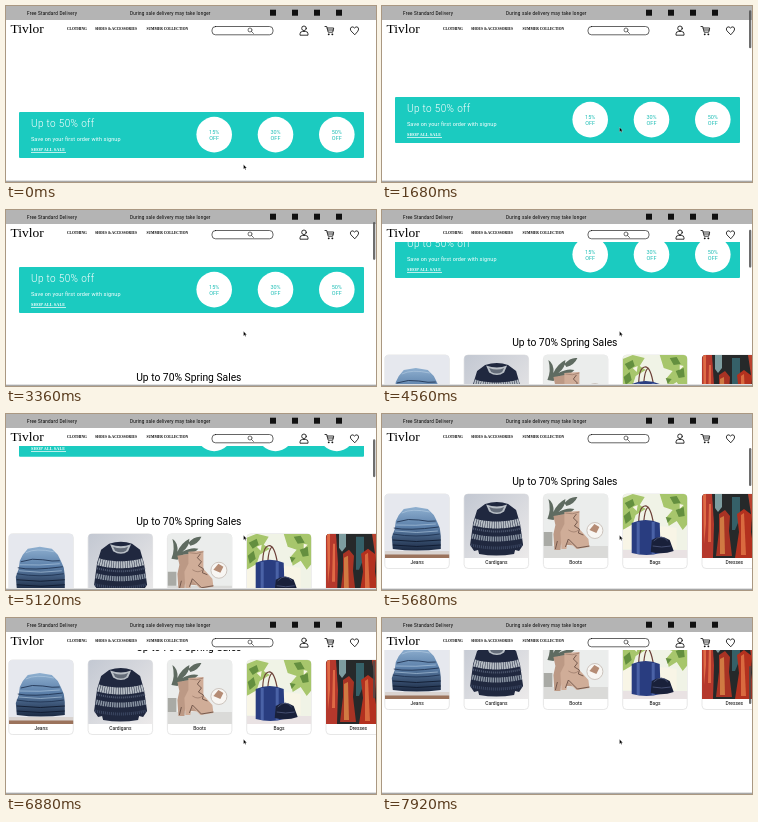
Animation, 370 px wide and 176 px high, one loop 8 s. Source, as an HTML page:

```html
<!DOCTYPE html>
<html lang="en">
<head>
<meta charset="utf-8">
<title>Shop page</title>
<style>
html, body { margin: 0; width: 100%; height: 100%; overflow: hidden; background: #fff; }
svg { display: block; width: 100vw; height: 100vh; }
text { font-family: Roboto, Inter, sans-serif; }
.serif { font-family: "Liberation Serif", "Noto Serif", serif; }
.mid { text-anchor: middle; }
.line { fill: none; stroke: #111; stroke-width: .85; stroke-linecap: round; stroke-linejoin: round; }
</style>
</head>
<body>
<svg viewBox="0 0 370 176" xmlns="http://www.w3.org/2000/svg">
  <defs>
    <clipPath id="photo"><path d="M0 64V4a4 4 0 0 1 4-4H60.500a4 4 0 0 1 4 4V64z"/></clipPath>
    <linearGradient id="wall" x2="1" y2="1">
      <stop stop-color="#c3c8d2"/><stop offset="1" stop-color="#eceaea"/>
    </linearGradient>
    <linearGradient id="denim" x2="0" y2="1">
      <stop stop-color="#8fb0d0"/><stop offset=".45" stop-color="#5c80aa"/><stop offset="1" stop-color="#1b2942"/>
    </linearGradient>
    <linearGradient id="edge" x2="0" y2="1">
      <stop stop-color="#fff"/><stop offset="1" stop-color="#8a8a8a"/>
    </linearGradient>
    <g id="jeans">
      <path fill="#e6e8ee" d="M0 0H65V64H0z"/>
      <path fill="#d9d3d0" d="M0 57H65V64H0z"/>
      <path fill="#9b735c" d="M0 60.500H65V64H0z"/>
      <path fill="url(#denim)" d="M14 21l5-6 12-2 12 2 6 6 3 6 3 7 1 8v13q-24 3-48 0l-1-12 3-8 1-8z"/>
      <g fill="none" stroke="#223655" stroke-width=".9">
        <path d="M12 28q12-4 22-2t17 1M9 34q14 3 45-1M8 40q23 4 47 0"/>
        <path stroke="#101b30" d="M8 46q23 3 48 0M8 51q24 3 48 0"/>
        <path stroke="#b6cde2" stroke-width=".6" d="M17 19q10-5 28-1M11 31q20 1 40-1M10 37q22 3 43 0"/>
      </g>
    </g>
    <g id="cardigan">
      <path fill="url(#wall)" d="M0 0H65V64H0z"/>
      <path fill="#20283f" d="M21 10q12-4 23 0l8 6 4 14 3 21-4 6-4-1-1 4q-18 3-35 0l-1-4-4 1-4-6 3-22 4-13z"/>
      <path fill="#b9bfc6" d="M22 10.500q11 4 21 0l-3 7q-7 5-15 0z"/>
      <path fill="#646c79" d="M25 13q8 3 15 0l-2 4q-5 3-11 0z"/>
      <g fill="none">
        <path stroke="#b8bfc6" stroke-width="7" stroke-dasharray="1.800 .5" d="M10 28q22 6 45 0"/>
        <path stroke="#4f5a72" stroke-width="2" stroke-dasharray="1 1" d="M9 34.500q23 6 48 0"/>
        <path stroke="#8b96a4" stroke-width="5" stroke-dasharray="1.500 .8" d="M8 42q23 6 50 0"/>
        <path stroke="#3c4863" stroke-width="3" stroke-dasharray="1 1" d="M7 51q25 6 51 0"/>
      </g>
    </g>
    <g id="boots">
      <path fill="#ebedec" d="M0 0H65V64H0z"/>
      <path fill="#dadad8" d="M0 52H65V64H0z"/>
      <path fill="#5f6b61" d="M4 25Q8 16 5 5q6 4 5 13 4-9 12-13 0 8-7 13 9-5 16-3-5 6-15 6l-6 5zM21 9q6-7 13-6-3 7-11 9z"/>
      <path fill="#a9aaa5" d="M0 38H9V52H0z"/>
      <circle cx="51.500" cy="36.500" r="8" fill="#f8f6f3" stroke="#c2b8b0" stroke-width=".8"/>
      <path fill="#b58c75" d="M46 36l5-6 5 3-3 6z"/>
      <path fill="#bc9985" d="M10 22l12-2 3 17 11 8 2 7-15-1-5-5-1 10H11l-1-16 2-9z"/>
      <path fill="#d0ad98" d="M21 18l15-1v18l9 10 1 8-13 2-9-9-1 9h-5l-1-17 4-8z"/>
      <path fill="none" stroke="#6b5146" stroke-width=".9" d="M22 53l3-8 9 9 12-2M12 55l2-8M33 20l-3 4 4 4-3 4 5 3-1 4 5 2"/>
      <path fill="none" stroke="#8e6e5e" stroke-width=".6" d="M22 19q7 2 14-1M25 36q6 4 10 0"/>
    </g>
    <g id="bags">
      <path fill="#f0f3e6" d="M0 0H65V64H0z"/>
      <path fill="#a7c66c" d="M0 4l10-4 12 3-5 8 6 4-10 6-4 12-9 3zM37 0h28v30l-5 6-6-9-8 5-2-9 6-7-9-3z"/>
      <path fill="#648f3f" d="M2 9l8-4 2 6-6 4zM1 22l6-5 2 8-6 5zM47 3l7-1 4 7-7 1zM53 16l8-3 1 9-6 1zM43 23l6 1-4 5z"/>
      <path fill="#f8f5e6" d="M10 13l5-2-1 6zM57 10l4 1-4 4zM0 36l12-7 42 5v21H0z"/>
      <path fill="#e9e2e3" d="M0 56H65V64H0z"/>
      <path fill="none" stroke="#6b3f37" stroke-width="1.200" d="M16 30q0-17 6-18t9 19M21 29q1-15 5-16"/>
      <path fill="#293d80" d="M9 29q14-6 28 0l1 30q-14 4-29 0z"/>
      <path fill="#4a62a6" d="M14 28h3v32h-3zM29 28h3v32h-3z"/>
      <path fill="#19203a" d="M29 46q9-6 18 0l4 11q-11 4-23 1z"/>
      <path fill="none" stroke="#4a5478" stroke-width=".9" d="M31 47q8-8 14 0M30 52q9 2 18 0"/>
    </g>
    <g id="dresses">
      <path fill="#26292a" d="M0 0H65V64H0z"/>
      <path fill="#b5382c" d="M0 0H10L12 30 11 64H0z"/>
      <path fill="#df6a45" d="M1 0H4V30L2 50zM7 10H9V48H6z"/>
      <path fill="#7d9da0" d="M13 0H20V13L16 18 13 14z"/>
      <path fill="#a83324" d="M17 20l6-4 5 6-1 15 3 25H14l3-25z"/>
      <path fill="#d07a42" d="M18 24l4-2 1 38h-5z"/>
      <path fill="#356068" d="M30 3H38V24L33 36H30z"/>
      <path fill="#b3311f" d="M35 20l7-5 8 6-1 17 4 26H33l4-26z"/>
      <path fill="#d96a3f" d="M39 21l3-2 2 42h-5z"/>
      <path fill="#b8422f" d="M46 0H65V64H54L49 20z"/>
    </g>
  </defs>

  <rect width="370" height="176" fill="#fff"/>
  <g id="page">
    <rect x="13" y="106" width="345" height="46" rx="1" fill="#1bcbc0"/>
    <g fill="#fff">
      <text x="25" y="121" font-size="10" font-weight="300" letter-spacing=".35">Up to 50% off</text>
      <text x="25" y="134.500" font-size="5.500" letter-spacing=".1">Save on your first order with signup</text>
      <text class="serif" x="25" y="145.200" font-size="4.200" font-weight="700" letter-spacing=".15">SHOP ALL SALE</text>
      <rect x="25" y="146.300" width="35" height=".7"/>
    </g>
    <g id="offers"></g>
    <text class="mid" x="182.800" y="220" font-size="10.300" fill="#000">Up to 70% Spring Sales</text>
    <g id="cards"></g>
  </g>

  <g id="header">
    <rect width="370" height="32" fill="#fff"/>
    <rect width="370" height="14" fill="#b4b4b4"/>
    <g font-size="4.600" letter-spacing=".2">
      <text x="21" y="8.700">Free Standard Delivery</text>
      <text x="124" y="8.700">During sale delivery may take longer</text>
    </g>
    <g id="social"></g>
    <text class="serif" x="4.500" y="27" font-size="13.500">Tivlor</text>
    <g font-size="3.600" font-weight="700">
      <text class="serif" x="61" y="24.200">CLOTHING</text>
      <text class="serif" x="89" y="24.200">SHOES &amp; ACCESSORIES</text>
      <text class="serif" x="140.500" y="24.200">SUMMER COLLECTION</text>
    </g>
    <g class="line">
      <rect x="206" y="20.500" width="61" height="8.300" rx="3.500" stroke-width=".65"/>
      <path stroke-width=".6" d="M246 24a2 2 0 1 0-4 0 2 2 0 0 0 4 0M245.500 25.500l2 2"/>
      <circle cx="298" cy="22.300" r="2.300"/>
      <path d="M294 28.800v-1q0-2.300 2.500-2.300h3q2.500 0 2.500 2.300v1z"/>
      <path d="M319 20.500h1.700l1.500 5.700h4.500l1-4.200h-6.500M322.300 24h5"/>
      <path stroke-width="1.800" d="M322.700 28.300h.1M326.300 28.300h.1"/>
      <path d="M348.500 28.500l-3.600-3.700q-1.300-2 .2-3.500 2-1.300 3.400.7 1.400-2 3.400-.7 1.500 1.500.2 3.500z"/>
    </g>
  </g>

  <rect id="thumb" x="367" width="2.300" height="38" rx="1.150" fill="#4a4a4a" fill-opacity=".8"/>
  <rect y="174" width="370" height="2" fill="url(#edge)"/>
  <path id="cursor" d="M0 0V4.600L1.100 3.700 1.800 5.300 2.600 4.900 1.900 3.400H3.300z" fill="#000" stroke="#fff" stroke-width=".3"/>
</svg>
<script>
const LOOP = 8000, STEP = 80;
const $ = id => document.getElementById(id);

$('offers').innerHTML = ['15%', '30%', '50%'].map((label, i) => {
  const x = 208.2 + i * 61.3;
  return `<circle cx="${x}" cy="128.600" r="17.800" fill="#fff"/>
    <g class="mid" font-size="5.500" fill="#1bbdb5">
      <text x="${x}" y="128">${label}</text><text x="${x}" y="134.300">OFF</text></g>`;
}).join('');

const products = [
  ['jeans', 'Jeans'], ['cardigan', 'Cardigans'], ['boots', 'Boots'], ['bags', 'Bags'], ['dresses', 'Dresses']
];
$('cards').innerHTML = products.map(([art, name], i) =>
  `<g transform="translate(${2.8 + i * 79.3} 229)">
    <rect width="64.500" height="74.500" rx="4" fill="#fff" stroke="#ddd" stroke-width=".7"/>
    <use href="#${art}" clip-path="url(#photo)"/>
    <text class="mid" x="32.300" y="70.300" font-size="4.900">${name}</text>
  </g>`).join('');

$('social').innerHTML = [267, 289, 311, 333].map(x =>
  `<rect x="${x - 3}" y="3.700" width="6" height="6" fill="#111"/>`).join('');

// Scroll offset over time: [ms, px]
const scrollKeys = [
  [0, 0], [320, 0], [1200, 6], [1680, 15], [2080, 27], [2480, 32], [2720, 32],
  [3360, 49], [3600, 56], [4560, 84], [5360, 123], [5680, 149], [6240, 172],
  [6880, 187], [7120, 197], [7920, 212]
];
const cursorKeys = [[0, 158.5], [320, 158.5], [1000, 121.3], [LOOP, 121.3]];

// Monotone cubic interpolation
function sample(keys, t) {
  const last = keys.length - 1;
  const slope = i => (keys[i + 1][1] - keys[i][1]) / (keys[i + 1][0] - keys[i][0]);
  const tangent = i => {
    if (i === 0) return 0;
    const a = slope(i - 1), b = i < last ? slope(i) : a;
    return a * b > 0 ? 2 * a * b / (a + b) : 0;
  };
  if (t >= keys[last][0]) return keys[last][1];
  const i = keys.findIndex(k => k[0] > t) - 1;
  const [t0, a] = keys[i], [t1, b] = keys[i + 1];
  const d = t1 - t0, u = (t - t0) / d, v = 1 - u;
  return a * v * v * (1 + 2 * u) + b * u * u * (3 - 2 * u)
    + d * u * v * (v * tangent(i) - u * tangent(i + 1));
}

function draw(ms) {
  const t = Math.floor(ms % LOOP / STEP) * STEP;
  const y = sample(scrollKeys, t);
  $('page').setAttribute('transform', `translate(0 ${-y})`);
  $('thumb').setAttribute('y', 1 + y * 0.222);
  $('thumb').setAttribute('visibility', t < 400 ? 'hidden' : 'visible');
  $('cursor').setAttribute('transform', `translate(237.500 ${sample(cursorKeys, t)})`);
}

const start = performance.now();
function tick() {
  draw(performance.now() - start);
  requestAnimationFrame(tick);
}
tick();
</script>
</body>
</html>
```
